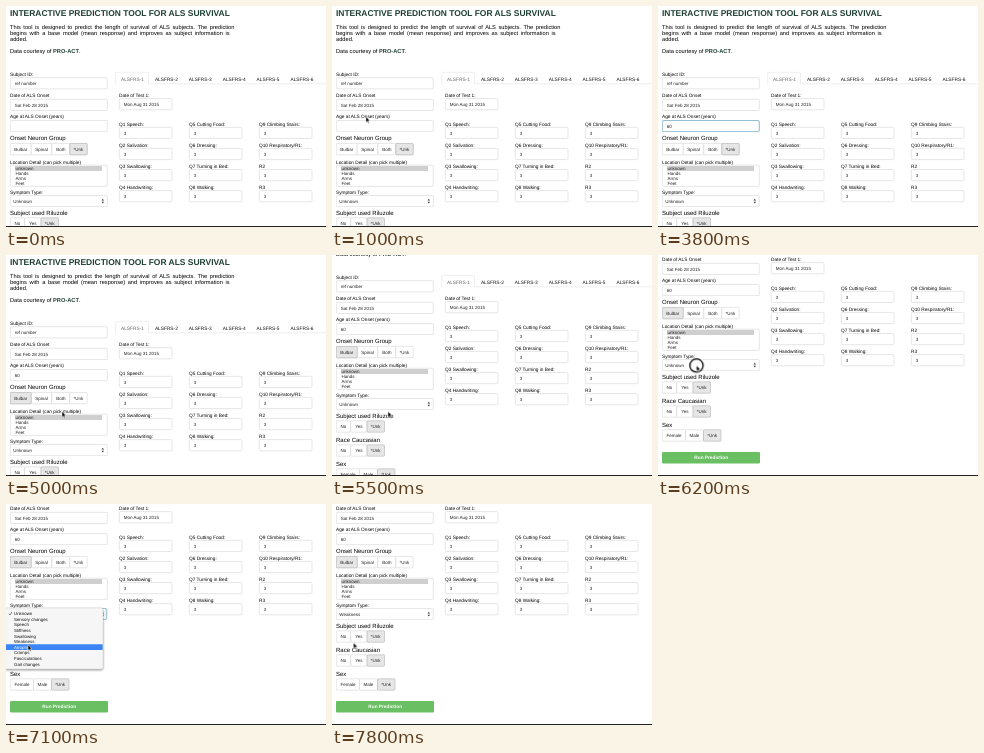
An HTML page that plays this animation: 320x221 px, repeating every 8 s.

```html
<!DOCTYPE html>
<html lang="en">
<head>
<meta charset="utf-8">
<title>Interactive prediction tool</title>
<style>
html, body { margin: 0; width: 100%; height: 100%; overflow: hidden; background: #fff; }
svg { display: block; width: 100vw; height: 100vh; }
text { font-family: "Liberation Sans", Arial, sans-serif; text-rendering: geometricPrecision; fill: #111; white-space: pre; }
.lbl { font-size: 4.75px; fill: #000; }
.val { font-size: 4.5px; fill: #222; }
.btn { font-size: 4.5px; fill: #222; }
.head { font-size: 6px; fill: #000; }
.para { font-size: 5.7px; fill: #000; }
.tab { font-size: 4.8px; }
.item { font-size: 4.38px; }
.title { font-size: 8.46px; font-weight: bold; fill: #1f3f33; }
.box { fill: #fff; stroke: #ccc; stroke-width: .5; }
.on { fill: #e6e6e6; stroke: #a8a8a8; stroke-width: .5; }
.focus { fill: none; stroke: #7fb2cc; stroke-width: .6; filter: drop-shadow(0 0 .5px #9cc8e0); }

/* one loop is 8000 ms: 1% = 80 ms */
.a { animation: 8s step-end infinite; }
#page { animation-name: scroll; }
#mouse { animation-name: move; }
#arrow { animation-name: arrow; }
#beam { animation-name: beam; }
#ring { animation-name: press; }
#unk { animation-name: unk; }
#bulbar { animation-name: bulbar; }
#ageFocus { animation-name: ageFocus; }
#six { animation-name: six; }
#zero { animation-name: zero; }
#caret { animation-name: caret; }
#menu { animation-name: menu; }
#pick { animation-name: pick; }
#selFocus { animation-name: selFocus; }
#before { animation-name: before; }
#after { animation-name: after; }

@keyframes scroll {
  0% { transform: translateY(0); }
  65% { transform: translateY(-23px); }
  68.75% { transform: translateY(-46px); }
  71.25%, 100% { transform: translateY(-85px); }
}
@keyframes move {
  0% { transform: translate(45px, 86px); }
  6.25% { transform: translate(45px, 86px); animation-timing-function: steps(7); }
  15% { transform: translate(29.5px, 120.5px); }
  50% { transform: translate(25px, 121px); animation-timing-function: steps(2); }
  52.5% { transform: translate(14px, 144px); }
  62.5% { transform: translate(56px, 156.5px); }
  72.5% { transform: translate(56px, 156.5px); animation-timing-function: steps(4); }
  77.5% { transform: translate(38.5px, 110.5px); }
  81.25% { transform: translate(38.5px, 110.5px); animation-timing-function: steps(6); }
  88.75% { transform: translate(22px, 140.8px); }
  91.25%, 100% { transform: translate(21.5px, 138.7px); }
}
@keyframes arrow { 0% { opacity: 0; } 6.25% { opacity: 1; } 15% { opacity: 0; } 50%, 100% { opacity: 1; } }
@keyframes beam { 0% { opacity: 0; } 15% { opacity: 1; } 40%, 100% { opacity: 0; } }
@keyframes press {
  0% { opacity: 0; transform: none; }
  26.25% { opacity: 1; transform: none; } 30% { opacity: 0; transform: none; }
  56.25% { opacity: 1; transform: none; } 60% { opacity: 0; transform: none; }
  77.5% { opacity: 1; transform: scale(1.18); } 80% { opacity: 0; transform: none; }
  93.75% { opacity: 1; transform: none; } 96.25%, 100% { opacity: 0; transform: none; }
}
@keyframes unk { 0% { opacity: 1; } 56.25%, 100% { opacity: 0; } }
@keyframes bulbar { 0% { opacity: 0; } 52.5%, 100% { opacity: 1; } }
@keyframes ageFocus { 0% { opacity: 0; } 26.25% { opacity: 1; } 56.25%, 100% { opacity: 0; } }
@keyframes six { 0% { opacity: 0; } 38.75%, 100% { opacity: 1; } }
@keyframes zero { 0% { opacity: 0; } 41.25%, 100% { opacity: 1; } }
@keyframes caret {
  0% { opacity: 0; transform: none; }
  26.25% { opacity: 1; transform: none; }
  33.75% { opacity: 0; transform: none; }
  38.75% { opacity: 1; transform: translateX(2.5px); }
  41.25% { opacity: 1; transform: translateX(5px); }
  47.5%, 100% { opacity: 0; transform: translateX(5px); }
}
@keyframes menu { 0% { opacity: 0; } 80% { opacity: 1; } 95%, 100% { opacity: 0; } }
@keyframes selFocus { 0% { opacity: 0; } 82.5% { opacity: 1; } 96.25%, 100% { opacity: 0; } }
@keyframes before { 0% { opacity: 1; } 95%, 100% { opacity: 0; } }
@keyframes after { 0% { opacity: 0; } 95%, 100% { opacity: 1; } }
@keyframes pick {
  0% { clip-path: inset(0 0 90% 0); }
  83.75% { clip-path: inset(10% 0 80% 0); }
  85% { clip-path: inset(30% 0 60% 0); }
  86.25% { clip-path: inset(40% 0 50% 0); }
  87.5% { clip-path: inset(50% 0 40% 0); }
  88.75% { clip-path: inset(60% 0 30% 0); }
  91.25%, 100% { clip-path: inset(50% 0 40% 0); }
}
</style>
</head>
<body>
<svg id="stage" viewBox="0 0 320 221" preserveAspectRatio="none"></svg>
<script>
// y is the middle of the line for text, the top for boxes
const text = (cls, x, y, s, extra = '') => `<text class="${cls}" x="${x}" y="${y + 1.7}" ${extra}>${s}</text>`;
const rect = (cls, x, y, w, h, r = 1.3, extra = '') =>
  `<rect class="${cls}" x="${x}" y="${y}" width="${w}" height="${h}" rx="${r}" ${extra}/>`;
const anim = (id, body) => `<g class="a" id="${id}">${body}</g>`;

const WIDE = 97;

const field = (label, x, y, w, value, gap = 9) =>
  text('lbl', x, y, label) + rect('box', x + .3, y + gap - 5.6, w, 11.2) + text('val', x + 4.7, y + gap, value);

const button = (s, x, w, y, cls = 'box') =>
  rect(cls, x, y - 5.7, w, 11.4, .9) + text('btn', x + w / 2, y, s, 'text-anchor="middle"');

function group(title, y, names, edges, active) {
  return text('head', 4, y, title) + names.map((n, i) =>
    button(n, edges[i], edges[i + 1] - edges[i], y + 10.5, i === active ? 'on' : 'box')).join('');
}

function intro() {
  const lines = [
    ['This tool is designed to predict the length of survival of ALS subjects. The prediction', 1],
    ['begins with a base model (mean response) and improves as subject information is', 1.05],
    ['added.', 0]
  ];
  return text('title', 4, 8.3, 'INTERACTIVE PREDICTION TOOL FOR ALS SURVIVAL') +
    lines.map(([s, gap], i) => text('para', 4, 21.5 + i * 5.9, s, `word-spacing="${gap}"`)).join('') +
    text('para', 4, 45.4, 'Data courtesy of <tspan font-weight="bold" fill="#1f3f33">PRO-ACT</tspan>.');
}

function leftSide() {
  const unk3 = [4.3, 18.7, 35, 52.5];
  const rows = ['unknown', 'Hands', 'Arms', 'Feet'];
  return field('Subject ID:', 4, 68.3, WIDE, 'ref number') +
    field('Date of ALS Onset', 4, 89.5, WIDE, 'Sat Feb 28 2015', 9.4) +
    field('Age at ALS Onset (years)', 4, 110.7, WIDE, '', 9.4) +
    anim('ageFocus', rect('focus', 4.3, 114.5, WIDE, 11.2)) +
    anim('six', text('val', 8.7, 120.1, '6')) + anim('zero', text('val', 11.2, 120.1, '0')) +
    anim('caret', '<path d="M9 117.4V122.3" stroke="#222" stroke-width=".5"/>') +
    group('Onset Neuron Group', 132.6, ['Bulbar', 'Spinal', 'Both', '*Unk'], [4.3, 25.2, 45.8, 63.8, 81.2], -1) +
    anim('bulbar', button('Bulbar', 4.3, 20.9, 143.1, 'on')) +
    anim('unk', button('*Unk', 63.8, 17.4, 143.1, 'on')) +
    text('lbl', 4, 155.8, 'Location Detail (can pick multiple)') +
    rect('box', 4.3, 159.2, WIDE, 21.2) +
    rect('', 9, 160, 87, 5, 0, 'fill="#cfcfcf"') +
    rows.map((s, i) => text('val', 9.6, 162.3 + i * 5.1, s)).join('') +
    text('lbl', 4, 186.3, 'Symptom Type:') +
    rect('box', 4.3, 189.5, WIDE, 11.2) +
    anim('before', text('val', 7.3, 195.1, 'Unknown')) + anim('after', text('val', 7.3, 195.1, 'Weakness')) +
    '<path d="M95.6 194.6l1.2-1.9 1.2 1.9zM95.6 195.7l1.2 1.9 1.2-1.9z" fill="#333"/>' +
    anim('selFocus', rect('focus', 4.3, 189.5, 96, 11.2)) +
    group('Subject used Riluzole', 207, ['No', 'Yes', '*Unk'], unk3, 2) +
    group('Race Caucasian', 231, ['No', 'Yes', '*Unk'], unk3, 2) +
    group('Sex', 255, ['Female', 'Male', '*Unk'], [4.3, 27.5, 45.5, 63], 2) +
    rect('', 4, 282, 98, 11.4, 1.2, 'fill="#6abf63"') +
    text('lbl', 53.2, 287.6, 'Run Prediction', 'text-anchor="middle" style="fill:#fff;font-weight:bold"');
}

function rightSide() {
  const cols = [
    ['Q1 Speech:', 'Q2 Salivation:', 'Q3 Swallowing:', 'Q4 Handwriting:'],
    ['Q5 Cutting Food:', 'Q6 Dressing:', 'Q7 Turning in Bed:', 'Q8 Walking:'],
    ['Q9 Climbing Stairs:', 'Q10 Respiratory/R1:', 'R2', 'R3']
  ];
  let out = '<path d="M109 77.8H109.7V67.5q0-1.2 1.2-1.2H141.3q1.2 0 1.2 1.2V77.8H320" fill="none" stroke="#ddd" stroke-width=".5"/>';
  for (let i = 0; i < 6; i++)
    out += text('tab', 115 + i * 33.9, 73.2, 'ALSFRS-' + (i + 1), i ? '' : 'style="fill:#666"');
  out += field('Date of Test 1:', 113, 89.2, 52.7, 'Mon Aug 31 2015');
  cols.forEach((col, c) => col.forEach((s, r) => {
    out += field(s, 113 + c * 70, 118.2 + r * 21.1, 52.7, '3', 8.7);
  }));
  return out;
}

function menu() {
  const items = ['Unknown', 'Sensory changes', 'Speech', 'Stiffness', 'Swallowing',
    'Weakness', 'Atrophy', 'Cramps', 'Fasciculations', 'Gait changes'];
  const list = style => items.map((s, i) => text('item', 8, 109.5 + i * 5.6, s, style)).join('') +
    `<path d="M3 109.7l1 1.3 1.8-3" fill="none" stroke-width=".6" stroke="#333"/>`;
  return rect('', -1, 104, 98, 61, 1.8,
    'fill="#f6f6f6" stroke="#c4c4c4" stroke-width=".4" style="filter:drop-shadow(0 1px 1.3px #0006)"') +
    list('') +
    anim('pick', rect('', 0, 106.7, 96.8, 56, 0, 'fill="#3a84f5"') + list('style="fill:#fff"'));
}

const mouse =
  anim('ring', '<circle r="5.6" fill="none" stroke="#000" stroke-width="1.1"/>') +
  anim('beam', '<path d="M-1.2-3.2Q0-3.2 0-2.4Q0-3.2 1.2-3.2M0-2.6V2.8M-1.2 3.4Q0 3.4 0 2.6Q0 3.4 1.2 3.4" fill="none" stroke="#111" stroke-width=".6"/>') +
  anim('arrow', '<path d="M0 0V5.7L1.3 4.5 2.2 6.6 3.2 6.2 2.3 4.1H4.1Z" fill="#000" stroke="#fff" stroke-width=".5"/>');

document.getElementById('stage').innerHTML =
  anim('page', intro() + leftSide() + rightSide()) +
  anim('menu', menu()) +
  anim('mouse', mouse) +
  rect('', 0, 220, 320, 1, 0, 'fill="#222"');
</script>
</body>
</html>
```
